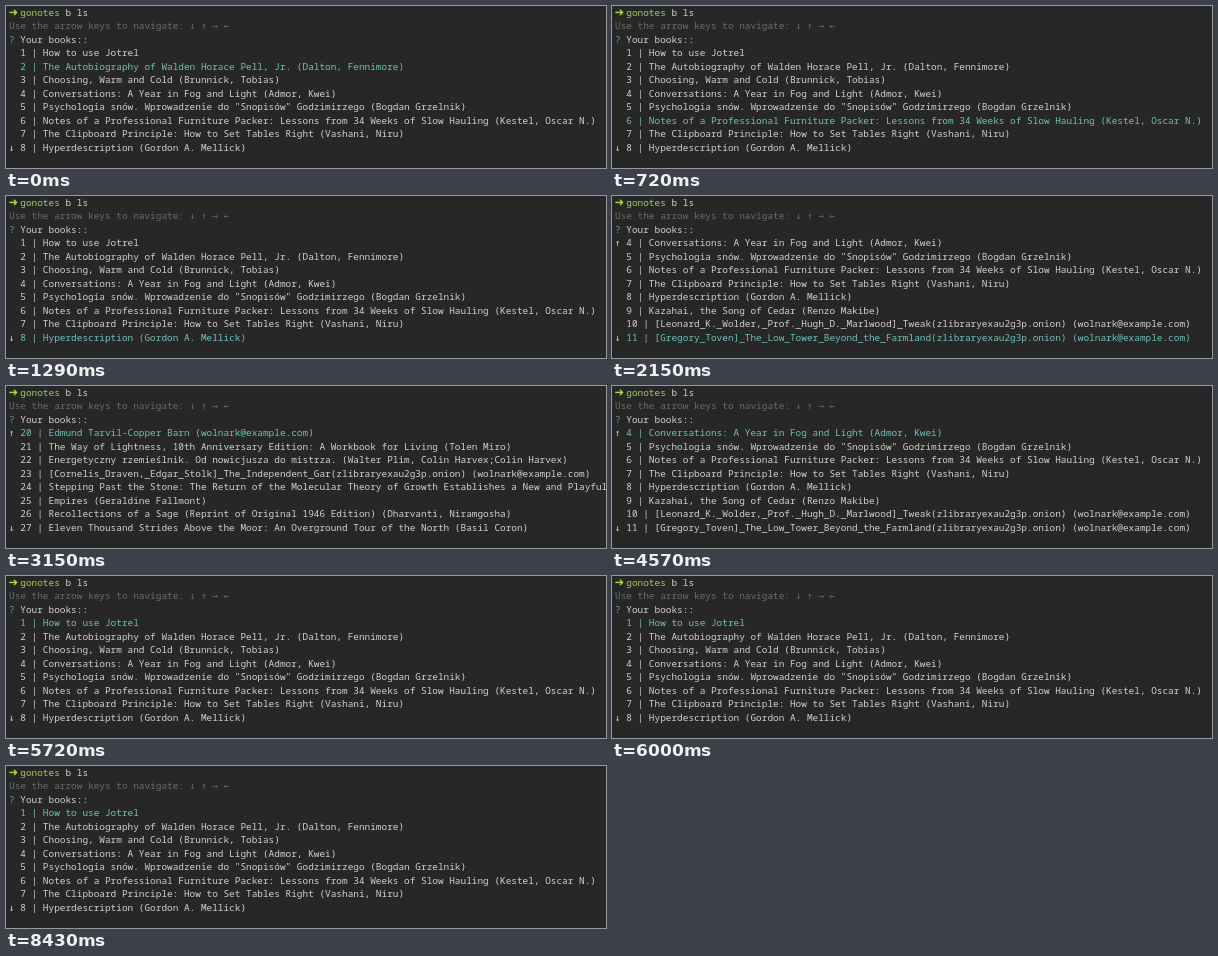
Animation of 600x162 px, one loop 8570 ms. Source, as an HTML page:

```html
<!DOCTYPE html>
<html lang="en">
<head>
<meta charset="utf-8">
<title>Book list in a terminal</title>
<style>
  html, body { margin: 0; width: 100%; height: 100%; overflow: hidden; background: #272727; }
  svg { display: block; width: 600px; height: 162px; }
  text { font: 9.42px "Noto Sans Mono", "DejaVu Sans Mono", monospace; white-space: pre; fill: #d2d2d2; }
  .dim { fill: #6b6b6b; }
  .on { fill: #6cc4bb; }
  .mark { fill: #5d9fa3; }
  .cmd { fill: #a3d05a; }
  .arrow { font-family: "DejaVu Sans Mono", monospace; }
  .tip { font: 11.5px "DejaVu Sans", sans-serif; fill: #a4e036; }
</style>
</head>
<body>
<svg id="term" viewBox="0 0 600 162"></svg>
<script>
const LOOP = 8570, ROWS = 8;
const LEFT = 3, CELL = 5.652, BASE = 9.6, PITCH = 13.54;
const site = '(zlibraryexau2g3p.onion)';
const mail = '(wolnark@example.com)';

const books = [
  'How to use Jotrel',
  'The Autobiography of Walden Horace Pell, Jr. (Dalton, Fennimore)',
  'Choosing, Warm and Cold (Brunnick, Tobias)',
  'Conversations: A Year in Fog and Light (Admor, Kwei)',
  'Psychologia snów. Wprowadzenie do "Snopisów" Godzimirzego (Bogdan Grzelnik)',
  'Notes of a Professional Furniture Packer: Lessons from 34 Weeks of Slow Hauling (Kestel, Oscar N.)',
  'The Clipboard Principle: How to Set Tables Right (Vashani, Niru)',
  'Hyperdescription (Gordon A. Mellick)',
  'Kazahai, the Song of Cedar (Renzo Makibe)',
  `[Leonard_K._Wolder,_Prof._Hugh_D._Marlwood]_Tweak${site} ${mail}`,
  `[Gregory_Toven]_The_Low_Tower_Beyond_the_Farmland${site} ${mail}`,
  'The Patient Gardener: A Short Guide to Long Seasons (Pellam, Irene)',
  'Quiet Numbers (Hobart T. Linsey)',
  'Letters from a Northern Workshop (Ostrand, Milo)',
  `[Clement_Farrow]_The_Second_Ledger${site} ${mail}`,
  'Sztuka spokojnego planowania (Lucjan Brzostek)',
  'Small Rooms: Essays on Making and Mending (Tarrow, Celia)',
  'A Field Book of Useful Mistakes (Norvin, Adela)',
  'The Slow Harbour (Edwin Calloss)',
  `Edmund Tarvil-Copper Barn ${mail}`,
  'The Way of Lightness, 10th Anniversary Edition: A Workbook for Living (Tolen Miro)',
  'Energetyczny rzemieślnik. Od nowicjusza do mistrza. (Walter Plim, Colin Harvex;Colin Harvex)',
  `[Cornelis_Draven,_Edgar_Stolk]_The_Independent_Gar${site} ${mail}`,
  'Stepping Past the Stone: The Return of the Molecular Theory of Growth Establishes a New and Playful Path',
  'Empires (Geraldine Fallmont)',
  'Recollections of a Sage (Reprint of Original 1946 Edition) (Dharvanti, Niramgosha)',
  'Eleven Thousand Strides Above the Moor: An Overground Tour of the North (Basil Coron)'
];

// time in ms, first visible book, selected book
const steps = [
  [0, 1, 2], [150, 1, 3], [430, 1, 4], [570, 1, 5], [720, 1, 6], [1000, 1, 7], [1150, 1, 8],
  [1430, 2, 9], [1570, 3, 10], [1860, 4, 11],
  [2430, 12, 12], [2860, 20, 20],
  [4150, 12, 12], [4570, 4, 4], [5430, 1, 1]
];

const term = document.getElementById('term');

function put(row, col, str = '', cls = '') {
  const el = document.createElementNS('http://www.w3.org/2000/svg', 'text');
  el.setAttribute('x', LEFT + col * CELL);
  el.setAttribute('y', BASE + row * PITCH);
  el.setAttribute('class', cls);
  el.textContent = str;
  return term.appendChild(el);
}

put(0.04, -0.1, '➜', 'tip');
put(0, 2, 'gonotes', 'cmd');
put(0, 10, 'b ls');
put(1, 0, 'Use the arrow keys to navigate:', 'dim');
[...'↓↑→←'].forEach((a, i) => put(1, 32 + 2 * i, a, 'dim arrow'));
put(2, 0, '?', 'mark');
put(2, 2, 'Your books::');

const lines = Array.from({ length: ROWS }, (_, i) => ({
  arrow: put(3 + i, 0, '', 'arrow'),
  item: put(3 + i, 2)
}));

let shown = null;

function show(step) {
  if (step === shown) return;
  shown = step;
  const [, top, pick] = step;
  lines.forEach(({ arrow, item }, i) => {
    const n = top + i;
    arrow.textContent = i === 0 && top > 1 ? '↑' : i === ROWS - 1 ? '↓' : '';
    item.textContent = `${n} | ${books[n - 1]}`;
    item.setAttribute('class', n === pick ? 'on' : '');
  });
}

function tick() {
  const t = performance.now() % LOOP;
  show(steps.findLast(s => s[0] <= t));
  requestAnimationFrame(tick);
}
tick();
</script>
</body>
</html>
```
